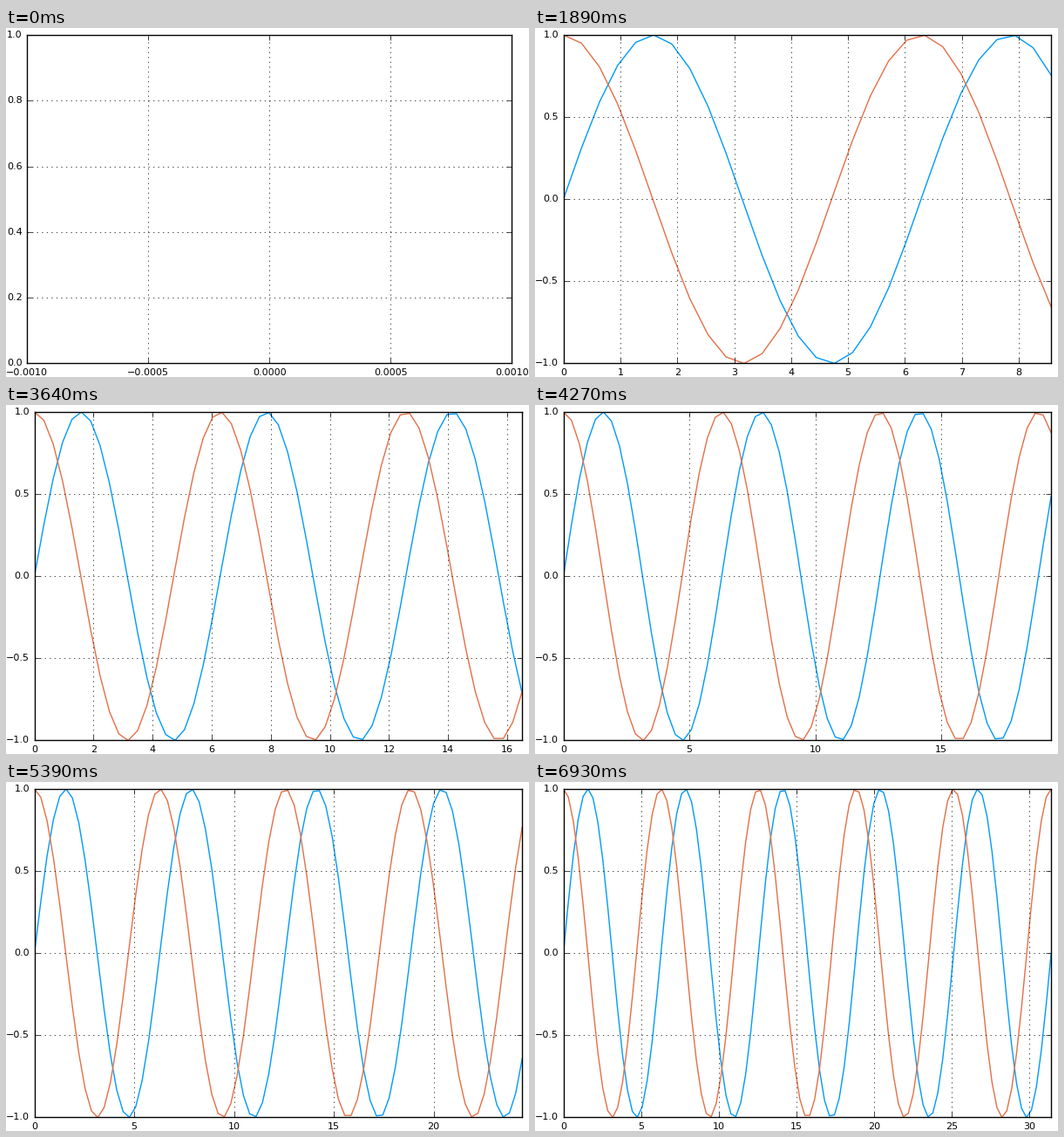
Animation of 600x400 px, one loop 7 s. Source, as a matplotlib script:

```python
import math

import matplotlib.pyplot as plt
import numpy as np
from matplotlib.animation import FuncAnimation

WIDTH, HEIGHT, DPI = 600, 400, 100
FRAMES, INTERVAL = 100, 70
TOP, BOTTOM = 8, 384.44

plt.style.use("classic")
plt.rcParams.update({
    "font.family": "DejaVu Sans",
    "font.size": 8,
    "xtick.labelsize": 8,
    "ytick.labelsize": 8,
    "ytick.alignment": "center",
    "figure.facecolor": "white",
    "savefig.facecolor": "white",
    "savefig.dpi": DPI,
    "axes.unicode_minus": True,
})

x = np.linspace(0, 10 * math.pi, FRAMES)
waves = [np.sin(x), np.cos(x)]

fig = plt.figure(figsize=(WIDTH / DPI, HEIGHT / DPI), dpi=DPI)
ax = fig.add_axes([0.05, 0.05, 0.9, 0.9])
ax.grid(True)
lines = [ax.plot([], [], color=c, lw=1)[0] for c in ("#009afa", "#e36f47")]


def nice_ticks(lo, hi, pixels, bins=9):
    """Round tick values and labels; ticks within half a pixel still count."""
    raw = (hi - lo) / bins
    scale = 10.0 ** math.floor(math.log10(raw))
    step = next(s * scale for s in (1, 2, 5, 10) if s * scale >= raw)
    slack = 0.5 * (hi - lo) / pixels
    first = math.ceil((lo - slack) / step)
    last = math.floor((hi + slack) / step)
    values = [k * step for k in range(first, last + 1)]
    digits = max(0, -math.floor(math.log10(step) + 1e-9))
    labels = [f"{v:.{digits}f}".replace("-", "\u2212") for v in values]
    return np.clip(values, lo, hi), labels


def limits(n):
    if n == 0:
        return (-0.001, 0.001), (0, 1)
    seen = np.concatenate([w[:n + 1] for w in waves])
    return (0, x[n]), (seen.min(), seen.max())


def draw(n):
    xlim, ylim = limits(n)
    yticks, ylabels = nice_ticks(*ylim, BOTTOM - TOP)

    # Margins follow the widest tick labels
    if n == 0:
        left, right = 24.1, 580.2
    else:
        left = 32.6 if yticks[0] < -0.1 else 23.6
        right = 592.13
    ax.set_position([left / WIDTH, 1 - BOTTOM / HEIGHT,
                     (right - left) / WIDTH, (BOTTOM - TOP) / HEIGHT])

    xticks, xlabels = nice_ticks(*xlim, right - left)
    ax.set_xticks(xticks, xlabels)
    ax.set_yticks(yticks, ylabels)
    ax.set_xlim(*xlim)
    ax.set_ylim(*ylim)

    for line, wave in zip(lines, waves):
        line.set_data(x[:n + 1], wave[:n + 1])
    return lines


anim = FuncAnimation(fig, draw, frames=FRAMES, interval=INTERVAL,
                     repeat=True, repeat_delay=0, blit=False)
plt.show()
```
